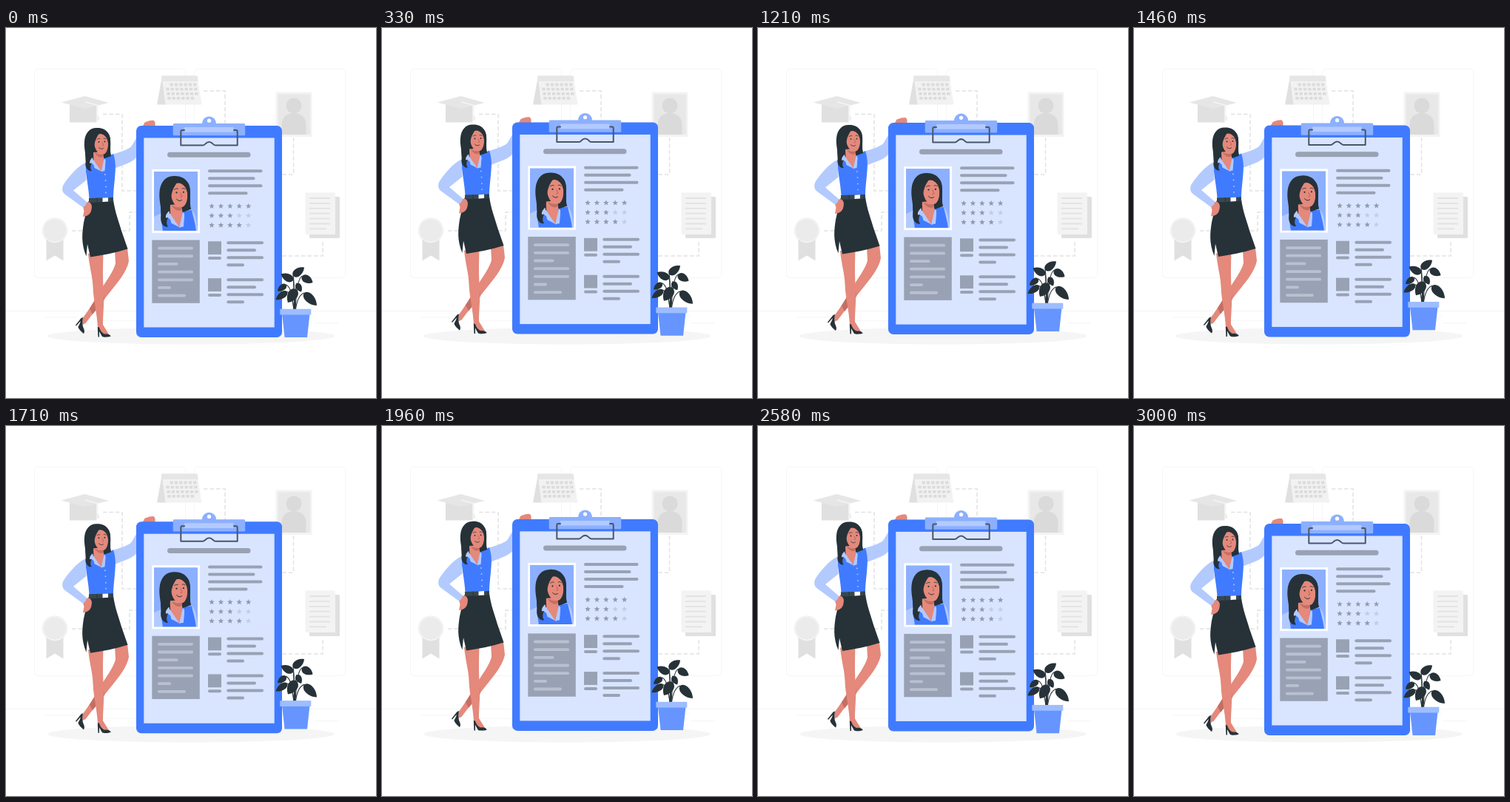
These frames come from a looping animation (500x500 px, 3040 ms). An HTML page:

```html
<!DOCTYPE html>
<html lang="en">
<head>
<meta charset="utf-8">
<title>Candidate profile</title>
<style>
  html, body { margin: 0; width: 100%; height: 100%; overflow: hidden; background: #fff; }
  svg { display: block; width: 100vw; height: 100vh; }
  .dash { fill: none; stroke: #e2e2e2; stroke-width: 1.5; stroke-dasharray: 5.5 3; }
  .hair { fill: #263238; }
  .skin { fill: #e4897b; }
  .shade { fill: #c46f63; }
  .blue { fill: #407bff; }
  .pale { fill: #b3caff; }
  .mid { fill: #8cb0ff; }
  .ink { fill: #99a2b4; }
  .line { fill: none; stroke: #263238; stroke-linecap: round; }
</style>
</head>
<body>
<svg viewBox="0 0 500 500">
  <defs>
    <clipPath id="portrait"><rect x="200" y="194" width="59" height="80"/></clipPath>
    <g id="head">
      <path class="hair" d="M122 135C113 135 107 142 106 153C105 164 109 172 107.500 183C107 189 111 194 116 193C113 190 114 184 118 179L134 176L142 173C139 163 144 150 138 142C135 137 129 134.500 122 135Z"/>
      <path class="skin" d="M118 168L118.500 180L128.500 194L132.500 179L131 167Z"/>
      <path class="shade" d="M120 168C124 171 128 171.500 131 170L131 174C127 176 122 173 120 168Z"/>
      <path class="skin" d="M119 151C119 146 123 143 128 143C135 143.500 138 149 138 157C138 165 135 170.500 131 170.800C124 171 118.500 163 119 151Z"/>
      <path class="hair" d="M128 140C123 146 120.500 151 119.500 158C119 167 117.500 172 115 179L108 181C107 165 104 145 128 140Z"/>
      <path class="hair" d="M126 142C133 143.500 137 148 138 155C138.500 162 137.500 168 135 173L142 173C139.500 163 144 148 137 141L127 138Z"/>
      <circle class="hair" cx="125.500" cy="154" r=".95"/>
      <circle class="hair" cx="133.500" cy="153.500" r=".95"/>
      <path class="line" stroke-width=".7" d="M123 150.500Q125 148.700 127 149.500M132 149.300Q134 148.500 135.500 150"/>
      <path fill="none" stroke="#b55d52" stroke-width=".7" d="M130 154L131.800 158.600L129.600 159"/>
      <path class="line" stroke-width=".8" d="M125.500 161.500Q128.500 165 131.500 162.500"/>
      <path class="pale" d="M117 175C113.500 178 112.500 181 113.500 183L118 181.500L128 194.500L125 190C121 186 118 181 117 175ZM132 175.500C134 179 133.500 187 128.500 195L133.500 189.500L134.500 178Z"/>
      <path class="pale" d="M113.500 181L118 178L128.500 193.500L119.500 189L118.500 185ZM132.500 177L134.500 180L133.500 193L128.500 194Z"/>
    </g>
  </defs>

  <g id="room">
    <g fill="none" stroke="#ebebeb" stroke-width=".5">
      <rect x="38.500" y="55.200" width="204" height="282.400" rx="5.500"/>
      <rect x="254.700" y="55.200" width="204" height="282.400" rx="5.500"/>
      <path d="M0 382.500H500M417 398.600H450M322 401.300H331M396.500 389.300H416M52.500 391H95.500M104.500 391H111M131.500 395.200H225"/>
    </g>
    <ellipse cx="250" cy="416.200" rx="194" ry="11.300" fill="#f5f5f5"/>
    <path class="dash" d="M131 116.500H157V220H177M89 274H167V249H177M267 85H296V132M388.500 148V198H372M428 289V308H372"/>

    <path fill="#e0e0e0" d="M86 102H122.500V127.500H86Z"/>
    <path fill="#e6e6e6" d="M74.500 100.500L106.500 92L139 101L107 109Z"/>
    <path fill="none" stroke="#f5f5f5" stroke-width="1.300" d="M107 100L124 104.500V121"/>
    <path fill="#f0f0f0" d="M123 119H125.500L126.500 125H121.500Z"/>

    <path fill="#e0e0e0" d="M211 65L204 103.500H217Z"/>
    <path fill="#f2f2f2" d="M210.500 64.500H258.500L264.500 103.500H215.500Z"/>
    <path fill="#e6e6e6" d="M210.500 64.500H258.500L259.700 72H210Z"/>
    <g id="days" fill="#dcdcdc"></g>

    <rect x="364.500" y="86.500" width="49" height="60.500" fill="#f3f3f3"/>
    <rect x="367.500" y="89.500" width="43.500" height="54.500" fill="#e8e8e8"/>
    <g fill="#dadada">
      <circle cx="389" cy="105" r="10.500"/>
      <path d="M372.500 144V131C372.500 120 380 115 389 115S405.500 120 405.500 131V144Z"/>
    </g>

    <rect x="410" y="228" width="41" height="56" rx="1.500" fill="#e0e0e0"/>
    <rect x="404.500" y="222.500" width="40.500" height="56.500" rx="1.500" fill="#f3f3f3"/>
    <g id="notes"></g>

    <path fill="#e0e0e0" d="M54.500 284H77.500V314.500L66 307.500L54.500 314.500Z"/>
    <circle cx="66" cy="273.500" r="17" fill="#ebebeb"/>
    <circle cx="66" cy="273.500" r="15.800" fill="none" stroke="#f8f8f8" stroke-width="1"/>
    <circle cx="66" cy="273.500" r="14.500" fill="#ebebeb"/>
  </g>

  <g id="hero">
    <path class="skin" d="M184 134L187.500 127.500C191 126 195 125 198.500 124.800C201 125 202.500 128 201 134Z"/>
    <path class="pale" d="M143 171C152 168 160 166 167 162C171 160 173 152 177 148H184V166C178 174 172 180 164 183L146 190Z"/>

    <path class="skin" d="M147 300L148 318C146 328 134 344 126 357C120 368 112 381 104 391.500L103 401L107.500 399C117 386 128 373 138 360C149 346 163 331 166 315L164 297Z"/>
    <path class="shade" d="M126 357C121 366 117 373 113 379L117 387L133 367L131 350Z"/>
    <path class="skin" d="M111 305C113 324 117 336 117.500 350C118 368 123 385 124 405L130 414L139 414L131 401C131 385 133 372 132 355C130.500 340 131 322 131.500 303Z"/>
    <path class="hair" d="M101.500 392L104 391C103.500 396 102.500 401 105 406C106.500 409 106 411.500 105 413C102.500 411 97.500 406.500 97.500 403.500C99 401 100.500 398.500 100.700 396L95 402.500L94 401.500Z"/>
    <path class="hair" d="M123.800 404L126 404.500C127.500 409 130 413 134 413.500C137 413 140.500 414 141.800 416.500C138 418 132 418 130 417C128 414 127 411.500 126 410L126 417.500H124.500Z"/>

    <path class="hair" d="M111.500 234L145 232C147 248 152 260 156 274L164.500 298.500C147 304 130 307 114 309.500L110 292L108.500 308.500C101 291 103 276 105 263Z"/>
    <path class="blue" d="M107 183L117 176L133 176L145 170C149 182 148 192 147 203C146 214 145 222 145 230L112.500 232C112 216 108 201 107 183Z"/>
    <path fill="#37474f" d="M112 230L145 229V234.500L112 236Z"/>
    <path fill="#fff" d="M130.500 229.600L138 229.200V234.500L130.500 235Z"/>
    <path class="line" stroke="#5b6b73" stroke-width=".7" d="M123 230V235M142.500 229.500V234.500"/>
    <g class="pale">
      <circle cx="133.800" cy="198" r=".9"/><circle cx="134.500" cy="206" r=".9"/>
      <circle cx="135" cy="214.500" r=".9"/><circle cx="135" cy="222.500" r=".9"/>
    </g>
    <path class="skin" d="M105 237L111 235C115 236 117 240 115.500 245C115 250 112 254 104 255L105.500 247L103.500 240Z"/>
    <path class="pale" d="M107.500 182C96 187 84 202 77.500 212C75 217 76 222 80 225L104 242.500C107 241 109 238 109 235L91 219.500L108.500 205.500Z"/>
    <use href="#head"/>

    <rect class="blue" x="176" y="132" width="197" height="286" rx="7"/>
    <rect x="186.300" y="148.500" width="176.400" height="256" fill="#d9e5ff"/>
    <path class="mid" d="M265 132V129A9.500 9.500 0 0 1 284 129V132Z"/>
    <circle cx="274.500" cy="125.200" r="2.600" fill="#fff"/>
    <rect class="mid" x="225.700" y="129" width="97.500" height="16.300" rx="1.500"/>
    <rect class="pale" x="241" y="134" width="66.500" height="6.700" rx="1"/>
    <path class="line" stroke="#455a64" stroke-width="2" stroke-linejoin="round" style="stroke:#48566b" d="M241 138H238Q236.300 138 236.300 140V158.500H266Q268 158.500 269.500 156.500Q274.500 151.500 279.500 156.500Q281 158.500 283 158.500H312.700V140Q312.700 138 311 138H308"/>

    <rect class="ink" x="218" y="167.700" width="112.500" height="7" rx="3.500"/>
    <rect x="197.300" y="191" width="64.700" height="86" fill="#fff"/>
    <rect class="mid" x="200" y="194" width="59" height="80"/>
    <g clip-path="url(#portrait)">
      <path class="pale" d="M198 256L211 250L250 245C256 249 258 262 259 275H198Z"/>
      <path class="blue" d="M209 254L220 248L240 247L251 246C253 256 256 264 257 275H212Z"/>
      <use href="#head" transform="translate(82.400 40.700) scale(1.180)"/>
    </g>
    <rect class="ink" x="197.300" y="286.500" width="64.500" height="85.300"/>
    <g id="resume"></g>
    <g id="stars"></g>
  </g>

  <g id="plant">
    <g id="stems" class="line" stroke-width="1.100"></g>
    <g id="leaves" class="hair"></g>
    <path fill="#6695ff" d="M373 386H410.500L407 418H376.500Z"/>
    <rect x="370.300" y="379.700" width="42" height="7.800" fill="#9ebdff"/>
  </g>
</svg>
<script>
const $ = id => document.getElementById(id);
const bar = (x, y, end, color = '#99a2b4', h = 4) =>
  `<rect x="${x}" y="${y - h / 2}" width="${end - x}" height="${h}" rx="${h / 2}" fill="${color}"/>`;

// Calendar: first x, top y, number of days
$('days').innerHTML = [[221.5, 74.6, 6], [216.3, 80.8, 7], [217.3, 87, 7], [218.2, 93, 6]]
  .map(([x, y, n]) => Array.from({ length: n }, (_, i) =>
    `<rect x="${x + i * 6.3}" y="${y}" width="4.400" height="3.800" rx=".5"/>`).join('')).join('');

$('notes').innerHTML = [438, 438, 438, 438, 438, 438, 433]
  .map((end, i) => bar(410, 230 + i * 6.9, end, '#e2e2e2', 1.8)).join('');

// Lines of the profile
let lines = [346.5, 336.5, 346.5, 326.5].map((end, i) => bar(273, 193.2 + i * 10, end)).join('');
lines += [253, 253, 232.5, 253, 253, 223, 243]
  .map((end, i) => bar(205, 297.6 + i * 10.67, end, '#b9c1d1', 3.8)).join('');
for (const y of [288.3, 338.2]) {
  lines += `<rect class="ink" x="273" y="${y}" width="18" height="17.800"/>` + bar(273, y + 22.8, 291);
  lines += [348, 338, 348, 322].map((end, i) => bar(298.3, y + 2 + i * 10, end)).join('');
}
$('resume').innerHTML = lines;

function star(x, y, fill) {
  const points = Array.from({ length: 10 }, (_, i) => {
    const r = i % 2 ? 1.75 : 4, a = i * Math.PI / 5;
    return `${x + r * Math.sin(a)},${y - r * Math.cos(a)}`;
  });
  return `<polygon points="${points.join(' ')}" fill="${fill}"/>`;
}
$('stars').innerHTML = [5, 3, 4].map((score, row) => [0, 1, 2, 3, 4].map(i =>
  star(278 + i * 12.4, 240.8 + row * 12.8, i < score ? '#919bb0' : '#c2cde4')).join('')).join('');

// Leaves: base, tip, half width
const leaves = [
  [388, 335, 403, 323.5, 7], [388, 341, 371.5, 332.5, 7], [400, 335.5, 414.5, 344, 7],
  [378.5, 347, 367, 355.5, 5.5], [380, 356.5, 364.5, 367, 6], [392, 353, 381, 371, 9],
  [393, 345, 399, 356.5, 5.5], [403, 358, 420, 375, 8]
];
function leaf([x, y, tx, ty, w]) {
  const dx = tx - x, dy = ty - y, len = Math.hypot(dx, dy);
  const nx = -dy / len * w, ny = dx / len * w;
  const side = (k, s) => `${x + dx * k + nx * s} ${y + dy * k + ny * s}`;
  return `<path d="M${x} ${y}C${side(.05, 1)} ${side(.65, 1)} ${tx} ${ty}C${side(.65, -1)} ${side(.05, -1)} ${x} ${y}Z"/>`;
}
$('leaves').innerHTML = leaves.map(leaf).join('');
$('stems').innerHTML = leaves.map(([x, y]) =>
  `<path d="M${390 + (x - 390) * .1} 381Q${390 + (x - 390) * .3} ${y + 3} ${x} ${y}"/>`).join('');

// Linear rise and fall, stepped at 24 frames a second
const LOOP = 3040, FPS = 24, RISE = 10;
const lift = (t, period) => RISE * (1 - Math.abs(2 * (t % period) / period - 1));
const start = performance.now();
function draw() {
  const time = (performance.now() - start) % LOOP;
  const t = Math.floor((time + 4.9) * FPS / 1000) * 1000 / FPS % 3000;
  $('hero').setAttribute('transform', `translate(0 ${-lift(t, 1500)})`);
  $('plant').setAttribute('transform', `translate(0 ${-lift(t, 3000)})`);
  requestAnimationFrame(draw);
}
draw();
</script>
</body>
</html>
```
